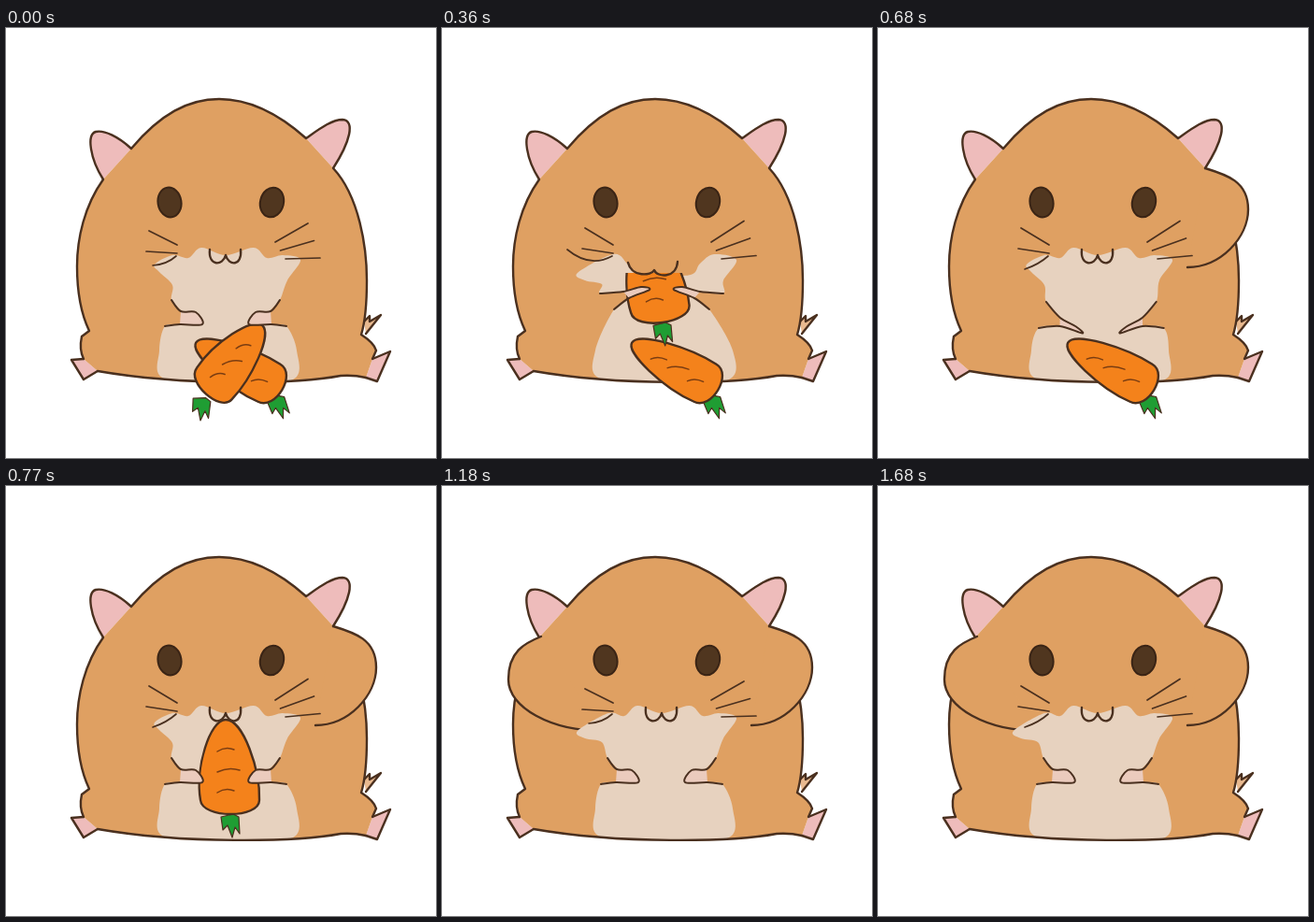
An HTML page for the animation above (1.81 s loop, 460 px wide and 460 px high).

```html
<!DOCTYPE html>
<html lang="en">
<head>
<meta charset="utf-8">
<title>Hamster snack</title>
<style>
html, body { margin: 0; width: 100%; height: 100%; overflow: hidden; background: #fff; }
svg { display: block; width: 100vw; height: 100vh; stroke-linecap: round; stroke-linejoin: round; }
</style>
</head>
<body>
<svg id="stage" viewBox="0 0 460 460"></svg>
<script>
const LOOP = 1810, FPS = 22, MEAL = 12;
const INK = '#4a301f', FUR = '#dfa062', CREAM = '#e7d2bf', PINK = '#eebcbb',
      PAW = '#ebcbbd', CARROT = '#f4821b', LEAF = '#1f9d33';
const stage = document.getElementById('stage');

const clamp = v => Math.max(0, Math.min(1, v));
const mix = (a, b, t) => Array.isArray(a) ? a.map((v, i) => mix(v, b[i], t)) : a + (b - a) * t;
const flip = (points, sum) => points.map(([x, y]) => [sum - x, y]).reverse();

// Smooth curve through points
function curve(p, closed) {
  const n = p.length;
  const at = i => closed ? p[(i + n) % n] : p[Math.max(0, Math.min(n - 1, i))];
  let d = 'M' + p[0];
  for (let i = 0; i < n - (closed ? 0 : 1); i++) {
    const [a, b, c, e] = [at(i - 1), at(i), at(i + 1), at(i + 2)];
    d += `C${b.map((v, j) => v + (c[j] - a[j]) / 6)} ${c.map((v, j) => v - (e[j] - b[j]) / 6)} ${c}`;
  }
  return d;
}
const shape = (d, fill = 'none', stroke = INK, w = 2.4) =>
  `<path d="${d}" fill="${fill}" stroke="${stroke}" stroke-width="${w}" vector-effect="non-scaling-stroke"/>`;

const TOP = 'M134 129C165 92 195 76 228 76C262 76 293 93 321 118';
const RIGHT = 'M350 150C378 180 386 235 386 270C386 295 384 315 380 328Q394 337 396 345L392 354';
const BOTTOM = 'M385 374Q372 371 358 372C310 381 190 383 98 367';
const LEFT = 'M83 354Q78 344 81 330L89 324C80 305 76 280 76 255C76 225 84 190 104 162';
const BODY = TOP + (RIGHT + BOTTOM + LEFT).replace(/M/g, 'L') + 'Z';
const EARS = 'M134 129C120 116 105 109 96 111C86 114 90 140 104 162M321 118C334 109 348 98 360 98C374 99 368 122 350 150';
const FEET = 'M83 354L70 355L83 376L98 367M392 354L411 346L397 378L385 374';
const TAIL = 'M383 314L389 308L389 314L401 307L385 327';

// Left arm from shoulder over the paw to the armpit; the right one is mirrored
const ARM = {
  low: [[180,293], [195,310], [212,320], [219,327], [195,319], [172,321]],
  rest: [[177,291], [187,303], [203,304], [210,317], [186,317], [170,319]],
  high: [[169,284], [194,282], [213,277], [222,280], [200,289], [184,301]]
};
const armAt = reach => mix(ARM.rest, reach < 0 ? ARM.low : ARM.high, Math.abs(reach));

// Left half of the upper muzzle edge, mouth empty and full
const MUZZLE = [[[178,243], [195,246], [209,235]], [[183,242], [198,252], [208,264]]];

function mouth(m) {
  const [l, lc, rc, r, mid] = mix(
    [[218,237], [216,255], [253,255], [251,237], [235,243]],
    [[199,251], [203,267], [251,268], [252,250], [227,259]], m);
  return shape(`M${l}C${lc} ${mid[0] - 3} ${mid[1] + 12 - 6 * m} ${mid}C${mid[0] + 3} ${mid[1] + 12 - 4 * m} ${rc} ${r}`);
}

function cheek(start, flat, stuffed, full) {
  if (!full) return '';
  const [[px, py], [ex, ey]] = mix(flat, stuffed, full);
  const [sx, sy] = start;
  return shape(`M${start}C${mix(sx, px, .5)} ${sy + 7} ${px} ${py - 30} ${px} ${py}
    C${px} ${py + 30} ${mix(px, ex, .45)} ${ey} ${ex} ${ey}`, FUR);
}

// Carrots grow upward from the leafy end
const FRONT = { at: [213,392], turn: 42, size: [.8,.94], leaf: [-3,6] };
const BACK = { at: [296,388], turn: -59, size: [.74,1.04], leaf: [-7,9] };
const HELD = { at: [240,352], turn: 0, size: [1,1], leaf: [0,2] };
const ROOT = 'M-32-16C-38-50-22-102-5-102C14-102 32-48 31-16C31 4-30 4-32-16Z';

function carrot({ at: [x, y], turn, size, leaf }, clip = '') {
  let stripes = '';
  for (let i = 0; i < 3; i++) {
    const w = 9 + 3 * (i % 2);
    stripes += `<g transform="translate(${-5 + 3 * (i % 2)} ${-70 + 22 * i}) rotate(${-turn})">
      ${shape(`M${-w} 2Q0-4 ${w} 0`, 'none', '#7a3d12', 1.5)}</g>`;
  }
  return `<g ${clip}><g transform="translate(${x + leaf[0]} ${y + leaf[1]}) rotate(${turn / 4})">
    ${shape('M-10 0L-8 14L-3 9L2 22L5 11L10 18L9 0L3-3Z', LEAF, INK, 1.2)}</g>
    <g transform="translate(${x} ${y}) rotate(${turn}) scale(${size})">${shape(ROOT, CARROT)}${stripes}</g></g>`;
}

function snack(floor, step, m) {
  if (step > 10) return '';
  if (step < 4) return carrot(floor);
  if (step === 4) {
    const mid = {};
    for (const key in floor) mid[key] = mix(floor[key], HELD[key], .55);
    return carrot(mid);
  }
  const n = step - 5;
  return carrot({ ...HELD, at: [240 - 4 * m, 352 - 9 * n - n * n], turn: -8 * m }, m ? 'clip-path="url(#bite)"' : '');
}

function whiskers(b, m) {
  let d = '';
  for (let i = 0; i < 2; i++)
    d += `M${153 - 3 * i} ${217 + 22 * i - 3 * b}L183 ${232 + 9 * i}`;
  const [tip, bend] = mix([[157,254 + 4 * b], [172,253]], [[134,237], [158,257]], m);
  d += `M${tip}Q${bend} 182 244`;
  for (let i = 0; i < 3; i++)
    d += `M${288 + 5.5 * i} ${229 + 9 * i}L${323 + 6.5 * i} ${209 + 18.5 * i - 2.5 * b}`;
  return shape(d, 'none', INK, 1.7);
}

const eye = (x, tilt) =>
  `<ellipse cx="${x}" cy="186.5" rx="12.5" ry="16" fill="#50361f" stroke="#3a2415" stroke-width="2" transform="rotate(${tilt} ${x} 186.5)"/>`;
const paw = p => shape(curve(p.slice(1, 5)), PAW, 'none') + shape(curve(p), 'none', INK, 2);

function draw(k) {
  const second = k > MEAL, idle = k - 2 * MEAL - 1, done = idle >= 0;
  const step = done ? MEAL : second ? k - MEAL : k;
  const reach = done ? 0 : step < 5 ? -Math.sin(Math.PI * step / 5) : Math.min(1, (step - 5) / 3, (13 - step) / 2);
  const m = step > 5 && step < 11 ? Math.sin(Math.PI * (step - 5) / 6) : 0;
  const stuff = clamp((step - 8) / 3);
  const fullR = second ? 1 : stuff, fullL = second ? stuff : 0;
  const twitch = done ? idle > 2 && Math.floor(idle / 3) % 2 === 0 : step > 2 && step < 9;

  const armL = armAt(reach), armR = flip(armL, 470 - 8 * Math.min(0, reach)).reverse();
  const brow = mix(...MUZZLE, m), lobeL = Math.max(m, fullL), lobeR = second ? 0 : fullR * reach;
  const sleeve = ([a, u, , , v, b]) => [a, u, v, b];
  const cream = [
    mix([159,253], [145,262], lobeL), ...brow, mix([235,243], [228,265], m), ...flip(brow, 474),
    mix([315,248], [315,263], lobeR), mix([301,270], [297,273], lobeR),
    ...sleeve(armR), [311,345], [307,376], [240,379], [169,375], [164,345], ...sleeve(armL).reverse(),
    mix([178,275], [171,274], lobeL), mix([164,261], [153,270], lobeL)];

  stage.innerHTML =
    `<clipPath id="bite"><rect y="${244 + 18 * m}" width="460" height="216"/></clipPath>` +
    shape(TAIL, '#e8b98f') + shape(EARS, PINK) + shape(FEET, PINK) +
    shape(BODY, FUR, 'none') + shape(TOP + RIGHT + LEFT) +
    cheek([106,161], [[82,205], [77,248]], [[71,207], [172,262]], fullL) +
    cheek([350,150], [[380,195], [386,240]], [[396,194], [331,256]], fullR) +
    shape(curve(cream, true), CREAM, 'none') + shape(BOTTOM) +
    eye(175, -9) + eye(284.5, 14) + whiskers(twitch ? 1 : 0, m) +
    (done ? '' : second ? snack(BACK, step, m) : carrot(BACK) + snack(FRONT, step, m)) +
    mouth(m) + paw(armL) + paw(armR);
}

let shown = -1;
function tick() {
  const t = Math.floor(performance.now() % LOOP / 10) * 10;
  const k = Math.floor((t + 5) * FPS / 1000);
  if (k !== shown) draw(shown = k);
  requestAnimationFrame(tick);
}
tick();
</script>
</body>
</html>
```
